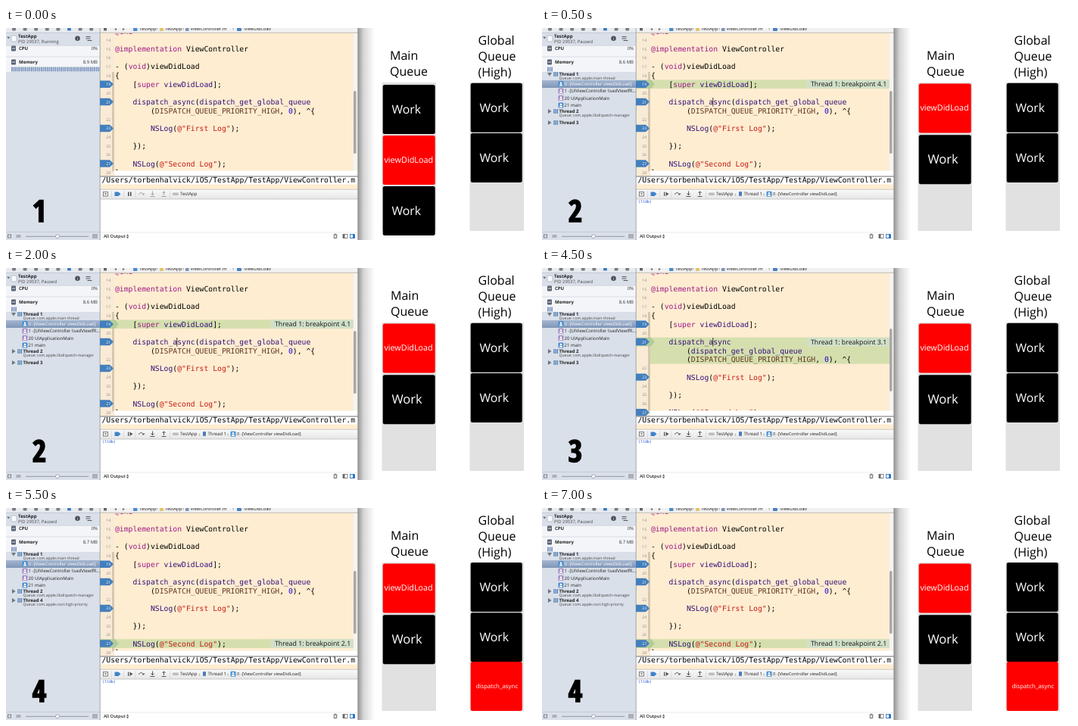
An HTML page for the animation above (8 s loop, 700x280 px).

```html
<!DOCTYPE html>
<html lang="en">
<head>
<meta charset="utf-8">
<title>Queues and breakpoints</title>
<style>
  html, body { margin: 0; width: 100%; height: 100%; overflow: hidden; background: #fff; }
  svg { display: block; width: 700px; height: 280px; }
  text { white-space: pre; text-rendering: geometricPrecision; font-family: "Open Sans", sans-serif; }
  .code { font-family: "DejaVu Sans Mono", monospace; }
  .big {
    font-family: "Liberation Sans Narrow", "Open Sans Condensed", "Open Sans", sans-serif;
    font-weight: 800; font-stretch: condensed; text-anchor: middle; stroke: #000; stroke-width: 1.6;
  }
</style>
</head>
<body>
<svg id="stage" viewBox="0 0 700 280" xmlns="http://www.w3.org/2000/svg"></svg>
<script>
const LOOP = 8000;
const LINE = 11.65;
const CHAR = 5.87;

// One entry per step of the debugging session
const STEPS = [
  { at: 0, n: 1, mem: '8.9 MB', running: true },
  { at: 500, n: 2, mem: '8.6 MB', hit: 19, tag: '4.1', caret: true, last: 'Thread 3' },
  { at: 3000, n: 3, mem: '8.6 MB', hit: 21, tag: '3.1', caret: true, wrap: true, last: 'Thread 3' },
  { at: 5500, n: 4, mem: '8.7 MB', hit: 27, tag: '2.1', last: 'Thread 4', async: true },
];

const rect = (x, y, w, h, fill, extra = '') =>
  `<rect x="${x}" y="${y}" width="${w}" height="${h}" fill="${fill}" ${extra}/>`;
const path = (d, fill, extra = '') => `<path d="${d}" fill="${fill}" ${extra}/>`;
const line = (d, stroke, w = 1) => path(d, 'none', `stroke="${stroke}" stroke-width="${w}"`);
const dot = (x, y, r, fill, extra = '') => `<circle cx="${x}" cy="${y}" r="${r}" fill="${fill}" ${extra}/>`;
const text = (x, y, s, size = 6, fill = '#222', extra = '') =>
  `<text x="${x}" y="${y}" font-size="${size}" fill="${fill}" ${extra}>${s}</text>`;
const bold = (x, y, s, size = 6) => text(x, y, s, size, '#222', 'font-weight="700"');
const right = (x, y, s) => text(x, y, s, 6, '#333', 'text-anchor="end"');
const code = (x, y, s, size = 9.75, fill = '#000') => text(x, y, s, size, fill, 'class="code"');

const RULES = [
  [/^@"[^"]*"/, '#c41a16'],
  [/^(@\w+|void|super)/, '#9b1a86'],
  [/^DISPATCH_\w+/, '#643820'],
  [/^(dispatch_\w+|NSLog|viewDidLoad(?=\]))/, '#35117a'],
  [/^0(?=\))/, '#1c00cf'],
];

function highlight(s) {
  let out = '';
  while (s) {
    const rule = RULES.find(([re]) => re.test(s));
    const part = rule ? s.match(rule[0])[0] : s.match(/^(\w+|.)/)[0];
    out += rule ? `<tspan fill="${rule[1]}">${part}</tspan>` : part;
    s = s.slice(part.length);
  }
  return out;
}

// Source rows as [line number, indent, text]
function sourceRows(wrap) {
  const call = wrap
    ? [[21, 4, 'dispatch_async'], ['', 8, '(dispatch_get_global_queue']]
    : [[21, 4, 'dispatch_async(dispatch_get_global_queue']];
  return [
    [13, 0, '@end'], [14, 0, ''], [15, 0, '@implementation ViewController'], [16, 0, ''],
    [17, 0, '- (void)viewDidLoad'], [18, 0, '{'], [19, 4, '[super viewDidLoad];'], [20, 0, ''],
    ...call, ['', 8, '(DISPATCH_QUEUE_PRIORITY_HIGH, 0), ^{'], [22, 0, ''],
    [23, 8, 'NSLog(@"First Log");'], [24, 0, ''], [25, 4, '});'], [26, 0, ''],
    [27, 4, 'NSLog(@"Second Log");'], [28, 0, '}'],
  ];
}

function editor(s) {
  let lines = '', gutter = '';
  sourceRows(s.wrap).forEach(([no, indent, src], i) => {
    const y = 4.3 + i * LINE;
    if (no === s.hit) {
      const h = s.wrap ? LINE * 3 : LINE;
      lines += rect(143, y - 5.8, 316, h, '#d5dfae') + rect(350, y - 5.8, 109, LINE, '#d1e0c8')
        + text(355, y + 3, `Thread 1: breakpoint ${s.tag}`, 8.8, '#111', 'font-weight="500"');
      gutter += path(`M124 ${y - 5.8}H144L149 ${y}L144 ${y + 5.8}H124Z`, '#b5cc98');
    }
    const stop = [19, 21, 23, 27].includes(no);
    if (stop) gutter += path(`M124 ${y - 4.7}H137L142 ${y}L137 ${y + 4.7}H124Z`, '#437fbd');
    gutter += text(138, y + 2, no, 5, stop ? '#fff' : '#8c8578', 'text-anchor="end"');
    if (src) lines += code(144 + indent * CHAR, y + 3.5, highlight(src));
  });
  if (s.caret) lines += line('M225.8 92V103.5', '#222', 0.9);
  return `<g clip-path="url(#edit)">${lines}</g><g clip-path="url(#gutter)">${gutter}</g>`
    + rect(459, s.wrap ? 80 : 83, 3.5, 83, '#a8a8a8', 'rx="1.7"');
}

const person = (x, y, fill) =>
  rect(x - 3, y - 3.5, 7, 7, fill, 'rx="1"') + dot(x + 0.5, y - 1, 1.3, '#fff') + rect(x - 1.5, y + 0.7, 4, 2, '#fff', 'rx="1"');

function thread(y, name, queue, open) {
  const arrow = open ? `M7 ${y - 2}h6l-3 4.5z` : `M8 ${y - 3}v6l4.5 -3z`;
  return path(arrow, '#6b7480') + line(`M16 ${y - 3}v6M18.2 ${y - 3}v6M20.4 ${y - 3}v6`, '#4d7fb5', 1.3)
    + bold(22.5, y + 2, name) + (queue ? text(22.5, y + 7.3, `Queue: ${queue}`, 5.1, '#444') : '');
}

function sidebar(s) {
  let out = text(16, 20.3, `PID 29537, ${s.running ? 'Running' : 'Paused'}`, 5.9, '#444') + right(121, 47.2, s.mem);
  for (let x = 7; x < (s.running ? 123 : 13); x += 2.6) out += rect(x, 51.5, 1.9, 6, '#8299bf');
  if (s.running) return out;
  const frames = [
    ['0 -[ViewController viewDidLoad]', '#4c8fd0'],
    ['1 -[UIViewController loadViewIfR…', '#a58bc4'],
    ['20 UIApplicationMain', '#a58bc4'],
    ['21 main', '#4c8fd0'],
  ];
  out += thread(61, 'Thread 1', 'com.apple.main-thread', true) + rect(0, 69, 124, 10, 'url(#pick)');
  frames.forEach(([label, fill], i) => {
    const y = 73.8 + i * 9.4;
    out += person(24.5, y, fill) + text(29.5, y + 2, label, 6, i ? '#222' : '#fff');
  });
  const high = s.last === 'Thread 4';
  return out + thread(110, 'Thread 2', 'com.apple.libdispatch-manager')
    + thread(high ? 122 : 125, s.last, high && 'com.apple.root.high-priority');
}

function debugBar(s) {
  const ink = s.running ? '#a2a2a2' : '#555';
  let out = s.running
    ? rect(161, 216.5, 1.6, 5.5, '#555') + rect(164, 216.5, 1.6, 5.5, '#555')
    : path('M161 216.5h1.2v5.5h-1.2zM163.5 216.5l4 2.7l-4 2.8z', '#555');
  out += line('M175 220q3.5 -5 7 0M180 220h2.2v-2', ink)
    + line('M193.5 215.5v5M191.5 218.5l2 2.2l2 -2.2M190.5 222.5h6', ink)
    + line('M208.5 221v-5M206.5 218l2 -2.2l2 2.2M205.5 222.5h6', ink);
  if (s.running) return out;
  return out + text(254.5, 221.5, '›', 7, '#777') + rect(260, 216, 4, 6, '#4d7fb5', 'rx="1"')
    + text(266.5, 221.3, 'Thread 1') + text(292, 221.5, '›', 7, '#777')
    + person(299.5, 219.2, '#4c8fd0') + text(305, 221.3, '0 -[ViewController viewDidLoad]', 5.7)
    + code(127, 231, '(lldb)', 5, '#2450d8');
}

function block(x, y, label, size, w = 68, h = 65) {
  const job = label === 'Work';
  const dx = job ? 11.7 : size > 10 ? 1.7 : 7;
  return rect(x, y, w, h, job ? '#000' : '#f00', 'rx="2.5"')
    + text(x + dx, y + h / 2 + (job ? 5.3 : size * 0.32), label, size, '#fff', 'font-weight="500"');
}

function queues(s) {
  const x = s.running ? 507 : 508;
  let out = text(x, 41.8, 'Main', 16, '#000') + text(x, 62.7, 'Queue', 16, '#000');
  out += s.running
    ? block(497.7, 75, 'Work', 15.8, 69) + block(497.7, 142, 'viewDidLoad', 10.9, 69) + block(497.7, 209, 'Work', 15.8, 69)
    : block(497.7, 73.4, 'viewDidLoad', 10.8, 69) + block(497.7, 141.2, 'Work', 16.5, 69);
  const rise = s.async ? 0.8 : 0;
  out += block(613.7, 72.7 - rise, 'Work', 15.8) + block(613.7, 139 - rise, 'Work', 15.8);
  if (s.async) out += block(613.7, 203, 'dispatch_async', 7.9);
  return out;
}

function base() {
  let out = `<defs>
    <clipPath id="edit"><rect x="124" y="7" width="341" height="181"/></clipPath>
    <clipPath id="gutter"><rect x="124" y="7" width="30" height="188.5"/></clipPath>
    <linearGradient id="pick" x2="0" y2="1"><stop stop-color="#a5b6d0"/><stop offset="1" stop-color="#7f96b8"/></linearGradient>
    <linearGradient id="bar" x2="0" y2="1"><stop stop-color="#fafafa"/><stop offset="1" stop-color="#e6e6e6"/></linearGradient>
    <linearGradient id="edge"><stop stop-color="#999"/><stop offset=".35" stop-color="#d8d8d8"/><stop offset="1" stop-color="#fff"/></linearGradient>
  </defs>`;
  out += rect(0, 0, 700, 280, '#fff') + rect(465, 0, 22, 280, 'url(#edge)');

  // Navigator
  out += rect(0, 0, 124, 280, '#dae0e9') + rect(0, 0, 124, 6, '#e9ebef') + line('M0 6.3H124', '#b9bec7', 0.7);
  for (let i = 0; i < 8; i++) out += rect(8 + i * 14.6, 0, 5, 3.5, i === 5 ? '#3f7fc4' : '#777d86', 'rx="1"');
  out += path('M1 11.5h4.5l-2.2 3z', '#6b7480') + rect(7, 10, 7, 8, '#f8f9fb', 'rx="1" stroke="#a5abb5" stroke-width=".7"')
    + bold(16, 13.4, 'TestApp', 6.2)
    + dot(94.5, 13.8, 3.3, '#4b4f57') + text(93.7, 16, 'i', 5.5, '#fff')
    + line('M105.5 11.5h6M105.5 14h6M107.5 16.5h6', '#555', 1.1)
    + rect(0, 23, 124, 35, '#f3f5f8') + line('M0 23.3H124M0 38H124', '#cbd0d9', 0.7);
  [27, 45].forEach((y, i) => {
    out += rect(7, y - 3.5, 6, 7, '#596474', 'rx="1"') + line(`M8 ${y}h4`, '#c9d4e4', 1.2)
      + bold(17, y + 2.2, i ? 'Memory' : 'CPU');
  });
  out += right(121, 29.2, '0%');

  // Navigator footer
  out += line('M0 269.5H124', '#bcc2cc', 0.7) + rect(2.5, 273, 4, 4, 'none', 'stroke="#666" stroke-width=".8"')
    + line('M13.5 274h6M13.5 276h6', '#666', 0.8) + line('M26 275.3H109', '#8f959e', 1)
    + dot(68, 275.3, 2.5, '#fff', 'stroke="#858b94" stroke-width=".7"')
    + line('M114 273h7M114 275h7M114 277h7', '#666', 0.8);

  // Source editor
  out += rect(124, 0, 341, 213, '#ffedd1') + rect(124, 7, 19, 188.5, '#f9ebd6')
    + rect(124, 0, 341, 6, '#f1f1f1') + line('M124 6.3H465', '#aaa', 0.7)
    + rect(140, 58, 3, 131, '#d6c8b0') + rect(458.5, 7, 6.5, 182, '#f6f4f0');
  out += rect(129, 0, 4, 3.5, '#666') + path('M146 0v3.5l-3 -2zM154 0v3.5l3 -2z', '#777')
    + rect(168, 0, 5.5, 4, '#4b8cca', 'rx="1"') + text(176, 3.3, 'TestApp')
    + text(198.5, 3.3, '›', 7, '#777') + rect(203, 0, 5, 4, '#e2c468') + text(210, 3.3, 'TestApp')
    + text(233, 3.3, '›', 7, '#777') + rect(237, 0, 4.5, 4, '#7d95b8') + text(243.5, 3.3, 'ViewController.m')
    + text(299, 3.3, '›', 7, '#777') + rect(305, 0, 6, 4, '#4b7fc2', 'rx="1"') + text(313.5, 3.3, '-viewDidLoad', 5.8);

  // File path strip
  out += rect(143, 188.5, 322, 8, '#fff') + rect(124, 195.5, 341, 11, '#fff')
    + line('M124 196H465', '#333', 0.7)
    + code(126.5, 204, '/Users/torbenhalvick/iOS/TestApp/TestApp/ViewController.m');

  // Debug area
  out += rect(124, 213, 341, 67, '#fff') + rect(124, 213, 341, 13, 'url(#bar)')
    + line('M124 213.2H465M124 226H465', '#b5b5b5', 0.7)
    + rect(128.5, 216.5, 6, 5.5, 'none', 'stroke="#666" stroke-width=".8"') + path('M130 218.3h3l-1.5 2z', '#666')
    + path('M143.5 216.5h5l3 2.8l-3 2.8h-5z', '#3f82cc')
    + line('M139.5 215v9M155.5 215v9M171 215v9M216.5 215v9', '#ccc', 0.6)
    + rect(220, 217.5, 8, 3.5, '#b9bdc2', 'rx="1"') + text(230, 221.3, 'TestApp')
    + line('M124 270H465', '#ddd', 0.6)
    + text(129, 277.3, 'All Output', 5.8, '#222', 'font-weight="600"')
    + path('M159 274.6l1.6 -2.2l1.6 2.2zM159 275.8l1.6 2.2l1.6 -2.2z', '#444')
    + line('M432.5 273h5M434 272.3h2M433.3 273.5v4h3.4v-4', '#555', 0.9)
    + rect(445, 272.5, 6, 5, '#fff', 'stroke="#666" stroke-width=".8"') + rect(445, 272.5, 2.5, 5, '#666')
    + rect(454.5, 272.5, 6, 5, '#fff', 'stroke="#2f75c6" stroke-width=".9"') + rect(458, 272.5, 2.5, 5, '#2f75c6')
    + line('M124.2 0V280', '#8e949d', 0.8) + line('M464.8 0V280', '#858585', 0.8);

  // Queue columns
  out += rect(496.5, 72, 71.5, 196, '#e1e1e1') + rect(612.5, 72, 71.5, 196, '#e1e1e1');
  ['Global', 'Queue', '(High)'].forEach((s, i) => { out += text(623.5, 22 + i * 21.2, s, 16, '#000'); });
  return out;
}

const stage = document.getElementById('stage');
const draw = s => editor(s) + sidebar(s) + debugBar(s) + queues(s)
  + text(44, 256, s.n, 40, '#000', 'class="big"');
stage.innerHTML = base() + STEPS.map(s => `<g class="step">${draw(s)}</g>`).join('');

stage.querySelectorAll('.step').forEach((el, i) => {
  const keys = STEPS.map((s, j) => ({ offset: s.at / LOOP, opacity: +(i === j), easing: 'step-end' }));
  keys.push({ ...keys[keys.length - 1], offset: 1 });
  el.animate(keys, { duration: LOOP, iterations: Infinity });
});
</script>
</body>
</html>
```
